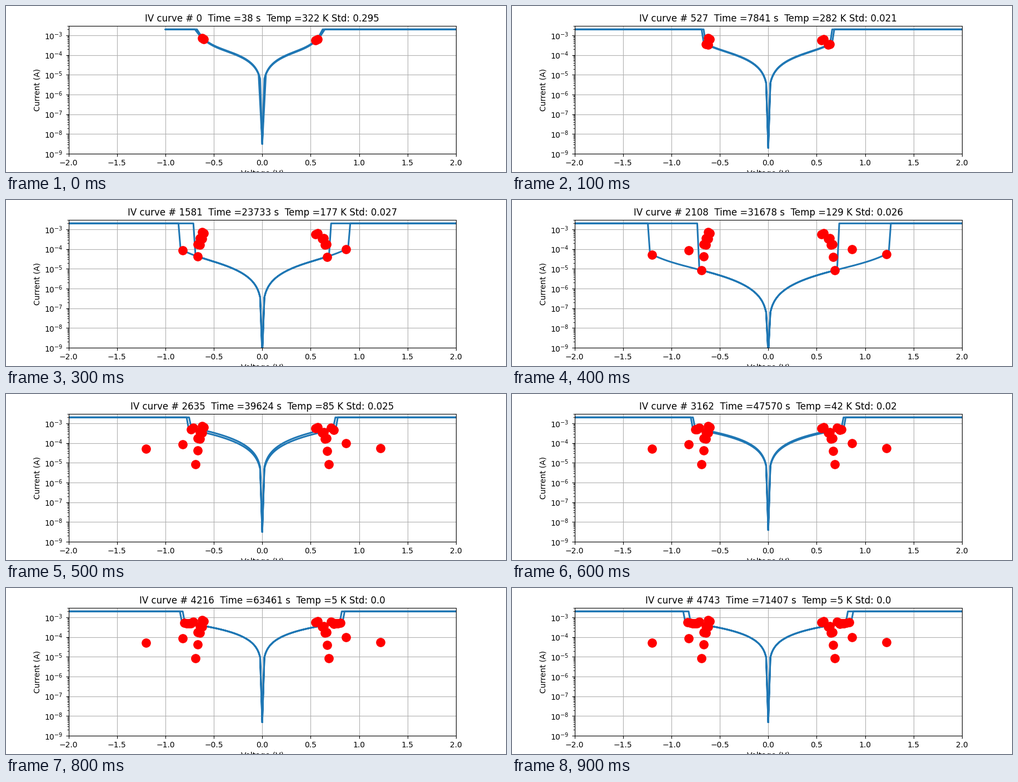
A matplotlib script that plays this animation: 900 px wide and 300 px high, repeating every 1000 ms.

```python
import numpy as np
import matplotlib.pyplot as plt
from matplotlib.animation import FuncAnimation

COMPLIANCE = 2e-3
STEP = 0.022
TEMPS = [322, 282, 229, 177, 129, 85, 42, 5, 5, 5]
STDS = [0.295, 0.021, 0.026, 0.027, 0.026, 0.025, 0.02, 0.0, 0.0, 0.0]


def hotness(k):
    """Extra softening of the switching above 282 K."""
    return max(0, TEMPS[k] - 282) / 40


def switch_voltages(k, sign):
    """Reset and set voltages drift up; the set one peaks in the insulating state."""
    early = 0.05 * np.exp(-2 * k) * (sign > 0)
    centre, height = 3.7 - 0.02 * sign, 0.655 + 0.038 * sign
    peak = height * np.exp(-(k - centre) ** 2 / 0.34)
    reset = min(0.623 + 0.022 * k, 0.8)
    return reset - early, 0.645 + 0.021 * k + 3e-5 * k ** 3 + peak - early


def conduction(k, v_set):
    """log10 conductance at zero field, field slope, heating, set branch drop."""
    if k < 5:
        heat = 0.3 * v_set + 0.3 * hotness(k)
        return -3.54 - 0.2 * k ** 1.66, 0.4 + 0.125 * k, heat, 0.04 * max(0, 1 - k / 3)
    cooled = min(k - 5, 2)
    return -3.54 + 0.09 * cooled, 0.65 - 0.21 * cooled, 0, 0.11 - 0.055 * cooled


def half_sweep(k, sign, end):
    """Out along the set branch, back along the reset one, and the switching points."""
    v_reset, v_set = switch_voltages(k, sign)
    g0, slope, heat, drop = conduction(k, v_set)
    tip = 10 ** max(g0 - 4.95, -9.3)

    def current(v, shift):
        field = slope * (np.sqrt(v) - np.sqrt(STEP))
        log_g = g0 - shift + field + heat * (v / v_set) ** 6
        return np.minimum(v * 10 ** log_g, COMPLIANCE)

    def branch(v_switch, shift, first):
        v = np.linspace(first, v_switch, 60)
        jump = v_switch + STEP * (1 + 1.3 * hotness(k))
        volts = np.r_[0, v, jump, end]
        return volts, np.r_[tip, current(v, shift), COMPLIANCE, COMPLIANCE]

    out_v, out_i = branch(v_set, drop, STEP * (1 + 0.7 * hotness(k)))
    back_v, back_i = branch(v_reset, 0, STEP)
    volts = sign * np.r_[out_v, back_v[::-1]]
    amps = np.r_[out_i, back_i[::-1]]
    points = [(sign * (v - STEP), current(v - STEP, shift))
              for v, shift in ((v_set, drop), (v_reset, 0))]
    return volts, amps, points


def sweep(k):
    pos_v, pos_i, pos_points = half_sweep(k, 1, 2)
    neg_v, neg_i, neg_points = half_sweep(k, -1, 1 if k == 0 else 2)
    return np.r_[pos_v, neg_v], np.r_[pos_i, neg_i], pos_points + neg_points


fig, ax = plt.subplots(figsize=(9, 3), dpi=100)
ax.set_yscale("log")
ax.set_xlim(-2, 2)
ax.set_ylim(1e-9, 3e-3)
ax.set_xlabel("Voltage (V)")
ax.set_ylabel("Current (A)")
ax.grid(True)
title = ax.set_title("")
curve, = ax.plot([], [], lw=2.2)
dots, = ax.plot([], [], "ro", ms=11)

sweeps = [sweep(k) for k in range(len(TEMPS))]


def update(k):
    time = max(38, round(7841.3 + 7945.68 * (k - 1)))
    title.set_text(f"IV curve # {527 * k}  Time ={time} s  "
                   f"Temp ={TEMPS[k]} K Std: {STDS[k]}")
    curve.set_data(*sweeps[k][:2])
    dots.set_data(*zip(*(p for s in sweeps[:k + 1] for p in s[2])))
    return title, curve, dots


anim = FuncAnimation(fig, update, frames=len(TEMPS), interval=100,
                     repeat=True, repeat_delay=0)
plt.show()
```
